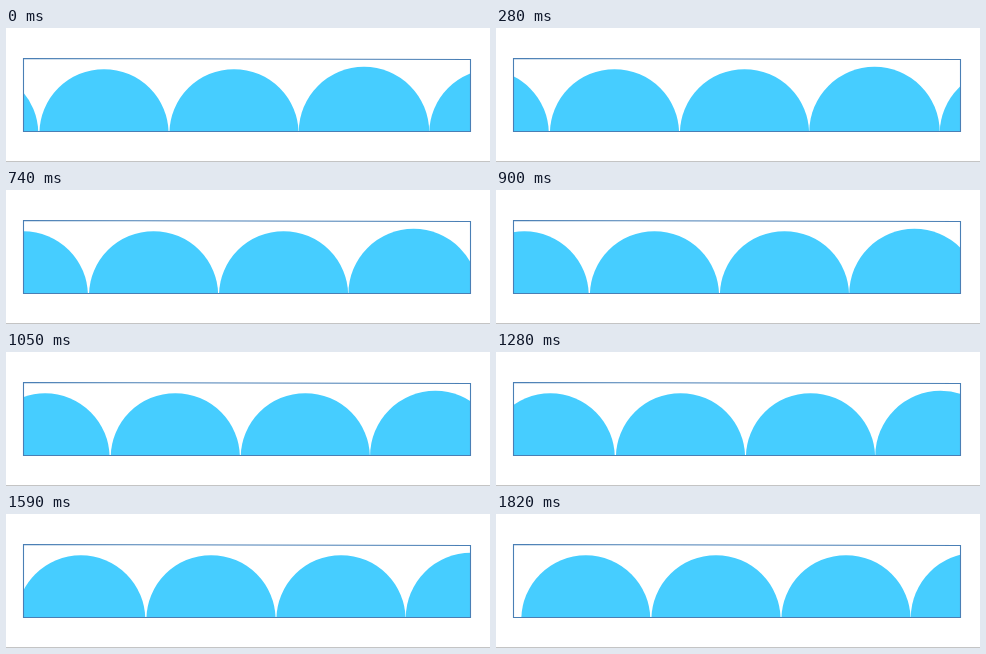
An HTML page that plays this animation: 484 by 134 pixels, repeating every 1900 ms.

```html
<!DOCTYPE html>
<html>
<head>
<meta charset="utf-8">
<style>
html, body { margin: 0; width: 100%; height: 100%; overflow: hidden; background: #fff; }
svg { display: block; }
</style>
</head>
<body>
<svg width="484" height="134" viewBox="0 0 484 134">
  <clipPath id="box"><path d="M17.5 30.5L464.5 31.5V103.5H17.5Z"/></clipPath>
  <g clip-path="url(#box)">
    <g id="row" fill="#46cdff">
      <circle cx="-32.2" cy="105.8" r="64.5"/>
      <circle cx="98" cy="105.8" r="64.6"/>
      <circle cx="228" cy="105.8" r="64.6"/>
      <circle cx="358" cy="104" r="65.2"/>
      <circle cx="487.8" cy="105.8" r="64.6"/>
    </g>
  </g>
  <path d="M17.5 30.5L464.5 31.5V103.5H17.5Z" fill="none" stroke="#4a7fb5" stroke-width="1.1"/>
  <path d="M0 133.5H484" stroke="#c4c4c4"/>
</svg>
<script>
const LOOP = 1900, STEPS = 25;
const row = document.getElementById('row');
// [step, shift in px]
const keys = [[0, 0], [4, 20.5], [10, 49.6], [14, 71.3], [17, 86.5], [21, 107], [24, 122]];

// The first steps last 70 ms, later ones about 77 ms.
const startOf = i => i < 4 ? 70 * i : Math.round((77 * i - 28) / 10) * 10;

function shiftAt(step) {
  const k = Math.max(1, keys.findIndex(([s]) => s >= step));
  const [s0, x0] = keys[k - 1], [s1, x1] = keys[k];
  return x0 + (x1 - x0) * (step - s0) / (s1 - s0);
}

function draw() {
  const t = performance.now() % LOOP;
  let step = STEPS - 1;
  while (startOf(step) > t) step--;
  row.setAttribute('transform', `translate(${shiftAt(step)} 0)`);
  requestAnimationFrame(draw);
}
draw();
</script>
</body>
</html>
```
